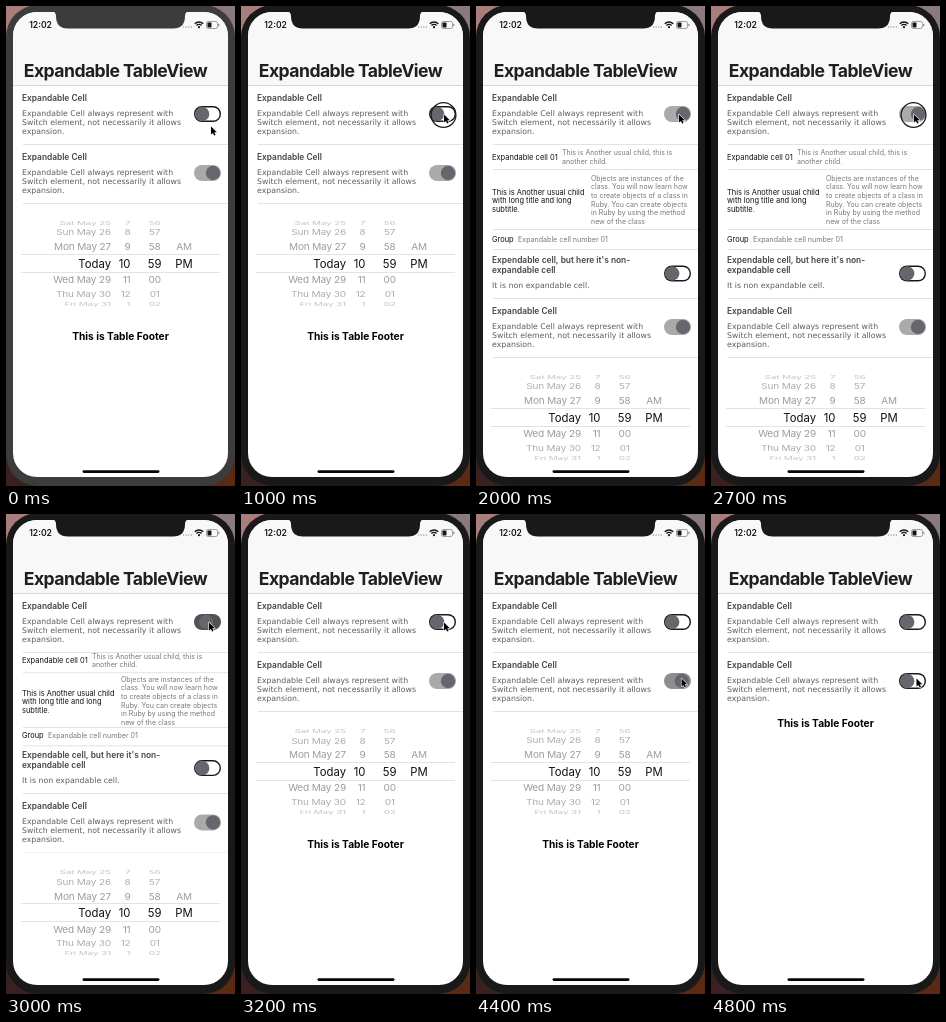
Animation of 229 by 480 pixels, one loop 5000 ms. Source, as an HTML page with a canvas:

```html
<!DOCTYPE html>
<html lang="en">
<head>
<meta charset="utf-8">
<title>Expandable TableView</title>
<style>
  html, body { margin: 0; width: 100%; height: 100%; overflow: hidden; background: #191919; }
  canvas { display: block; width: 229px; height: 480px; }
</style>
</head>
<body>
<canvas id="stage" width="229" height="480"></canvas>
<script>
const ctx = document.getElementById('stage').getContext('2d');
const LOOP = 5000, STEP = 100;
const CLICKS = { open: 900, close: 2700, hidePicker: 4200 };
const CHILD_HEIGHT = 154, PICKER_HEIGHT = 121;
const LEFT = 16;
const UI = 'Inter, sans-serif', BODY = '"DejaVu Sans", sans-serif';

const clamp = v => Math.max(0, Math.min(1, v));
const mix = (a, b, k) => a + (b - a) * k;
const smooth = v => { v = clamp(v); return v * v * (3 - 2 * v); };
const gray = v => `rgb(${v},${v},${v})`;

function text(str, x, y, size, color, { weight = 400, family = UI, align = 'left', track = 0 } = {}) {
  ctx.font = `${weight} ${size}px ${family}`;
  ctx.letterSpacing = track * size + 'px';
  ctx.textAlign = align;
  ctx.fillStyle = color;
  ctx.fillText(str, x, y);
}

function lines(list, x, y, leading, ...style) {
  list.forEach((str, i) => text(str, x, y + i * leading, ...style));
}

function roundRect(x, y, w, h, r, color) {
  ctx.fillStyle = color;
  ctx.beginPath();
  ctx.roundRect(x, y, w, h, r);
  ctx.fill();
}

function disc(x, y, r, color) {
  ctx.fillStyle = color;
  ctx.beginPath();
  ctx.arc(x, y, r, 0, Math.PI * 2);
  ctx.fill();
}

function separator(y, x = 17, right = 222, color = '#e3e3e3') {
  ctx.fillStyle = color;
  ctx.fillRect(x, Math.round(y), right - x, 1);
}

function clipped(y, h, alpha, draw) {
  if (h <= 0) return;
  ctx.save();
  ctx.beginPath();
  ctx.rect(7, y, 215, h);
  ctx.clip();
  ctx.globalAlpha = alpha;
  draw();
  ctx.restore();
}

// on runs from 0 (white, outlined) to 1 (gray, filled)
function toggle(y, on) {
  roundRect(188, y - 8, 27, 16, 8, gray(Math.round(mix(24, 170, on))));
  const inner = clamp((0.4 - on) / 0.4);
  if (inner > 0) {
    const w = 24.2 * inner, h = 13.2 * inner;
    roundRect(201.5 - w / 2, y - h / 2, w, h, h / 2, '#fff');
  }
  disc(mix(196.2, 207, smooth(on)), y, 7.2, '#66676e');
}

function expandableCell(top, on) {
  text('Expandable Cell', LEFT, top + 16, 8.35, '#444', { weight: 600 });
  lines(['Expandable Cell always represent with',
         'Switch element, not necessarily it allows',
         'expansion.'], LEFT, top + 30.6, 9.1, 7.8, '#5c5c5c', { family: BODY });
  toggle(top + 29, on);
}

function children(open) {
  const shift = CHILD_HEIGHT * (1 - open);
  const row = (lag, draw) => {
    ctx.save();
    ctx.translate(0, -shift * lag);
    draw();
    ctx.restore();
  };
  row(0.38, () => {
    text('Expandable cell 01', LEFT, 153.6, 7.5, '#111');
    lines(['This is Another usual child, this is', 'another child.'], 86, 149.4, 8.8, 7, '#777');
    separator(163);
  });
  row(0.56, () => {
    lines(['This is Another usual child', 'with long title and long', 'subtitle.'],
      LEFT, 188.6, 8.8, 7.45, '#111');
    lines(['Objects are instances of the', 'class. You will now learn how',
           'to create objects of a class in', 'Ruby. You can create objects',
           'in Ruby by using the method', 'new of the class'], 115, 174.6, 8.7, 7, '#777');
  });
  row(0.8, () => separator(223));
  row(0.93, () => {
    text('Group', LEFT, 236, 7.45, '#111');
    text('Expandable cell number 01', 42, 236, 7.1, '#777');
    separator(243);
  });
  row(1.07, () => {
    lines(["Expendable cell, but here it's non-", 'expandable cell'], LEFT, 257.4, 9.9, 8.4, '#444', { weight: 600 });
    text('It is non expandable cell.', LEFT, 282.4, 7.8, '#5c5c5c', { family: BODY });
    toggle(267.5, 0);
  });
}

const DAYS = ['Sat May 25', 'Sun May 26', 'Mon May 27', 'Today', 'Wed May 29', 'Thu May 30', 'Fri May 31'];

function picker(center) {
  const shades = ['#111', '#9c9c9c', '#acacac', '#c4c4c4'];
  DAYS.forEach((day, i) => {
    const d = i - 3, angle = d * 0.37, far = Math.abs(d);
    const size = far ? 10 : 11.3, color = shades[far];
    ctx.save();
    ctx.translate(0, center + 45.5 * Math.sin(angle));
    ctx.scale(1, far === 3 ? 0.5 : Math.cos(angle));
    const put = (str, x, align) => text(str, x, size * 0.36, size, color, { align, track: far ? -0.015 : 0 });
    put(day, 105, 'right');
    put(String((6 + i) % 12 + 1), 124.5, 'right');
    put(String((56 + i) % 60).padStart(2, '0'), 148.7, 'center');
    if (d === -1 || d === 0) put(d ? 'AM' : 'PM', 178, 'center');
    ctx.restore();
  });
  separator(center - 10, 15, 214);
  separator(center + 8, 15, 214);
}

function statusBar(bezel) {
  ctx.fillStyle = bezel;
  ctx.beginPath();
  ctx.moveTo(46, 5);
  ctx.quadraticCurveTo(50, 6, 50, 10);
  ctx.quadraticCurveTo(50, 22.5, 62, 22.5);
  ctx.lineTo(167, 22.5);
  ctx.quadraticCurveTo(179, 22.5, 179, 10);
  ctx.quadraticCurveTo(179, 6, 183, 5);
  ctx.fill();
  text('12:02', 23.2, 22, 8.6, '#161616', { weight: 600 });
  for (let i = 0; i < 4; i++) disc(177.5 + i * 2.6, 21, 0.7, '#999');
  ctx.strokeStyle = '#161616';
  ctx.lineWidth = 1.4;
  for (const r of [6, 3.6]) {
    ctx.beginPath();
    ctx.arc(193, 22, r, -Math.PI * 0.75, -Math.PI * 0.25);
    ctx.stroke();
  }
  disc(193, 21.2, 1.1, '#161616');
  ctx.strokeStyle = '#888';
  ctx.lineWidth = 0.8;
  ctx.beginPath();
  ctx.roundRect(200.5, 15.5, 11, 7, 1.8);
  ctx.stroke();
  roundRect(201.5, 16.5, 4, 5, 0.8, '#161616');
  roundRect(212.3, 17.8, 1, 2.4, 0.5, '#888');
}

function pointer(t) {
  const path = [[0, 300, -0.5, -2], [400, 700, -1.5, -10], [3500, 4100, 2.5, 56]];
  let x = 205, y = 120.5;
  for (const [from, to, dx, dy] of path) {
    const k = smooth((t - from) / (to - from));
    x += dx * k;
    y += dy * k;
  }
  if (Object.values(CLICKS).some(c => t >= c && t < c + 200)) {
    ctx.strokeStyle = '#1c1c1c';
    ctx.lineWidth = 1.3;
    ctx.beginPath();
    ctx.arc(x - 0.5, y + 0.5, 12.4, 0, Math.PI * 2);
    ctx.stroke();
  }
  ctx.save();
  ctx.translate(x, y);
  ctx.beginPath();
  [[0, 0], [0, 8], [1.9, 6.4], [3.2, 9], [4.5, 8.4], [3.3, 5.8], [5.8, 5.8]]
    .forEach(([px, py]) => ctx.lineTo(px, py));
  ctx.closePath();
  ctx.lineJoin = 'round';
  ctx.lineWidth = 1.2;
  ctx.strokeStyle = '#f4f4f4';
  ctx.stroke();
  ctx.fillStyle = '#000';
  ctx.fill();
  ctx.restore();
}

function phone(bezel) {
  ['#a87e7c', '#8a7a80', '#3b2020', '#5a2a14'].forEach((color, i) => {
    ctx.fillStyle = color;
    ctx.fillRect(i % 2 * 115, i < 2 ? 0 : 240, 115, 240);
  });
  roundRect(0, -1, 229, 481, 32, bezel);
}

function draw(t) {
  const flip = click => clamp((t - click - 150) / 250);
  const slide = click => smooth((t - click - 257) / 245);
  const open = slide(CLICKS.open) - slide(CLICKS.close);
  const pickerOpen = 1 - slide(CLICKS.hidePicker);
  const second = 138 + CHILD_HEIGHT * open;
  const third = second + 59;
  const footer = third + 16.4 + PICKER_HEIGHT * pickerOpen;
  const bezel = t < CLICKS.open ? '#3c3c3c' : '#191919';

  phone(bezel);

  ctx.save();
  ctx.beginPath();
  ctx.roundRect(7, 6, 215, 465, 24);
  ctx.clip();
  ctx.fillStyle = '#fff';
  ctx.fillRect(7, 6, 215, 465);
  ctx.fillStyle = '#f8f8f8';
  ctx.fillRect(7, 6, 215, 73);
  separator(79, 7, 222, '#d6d6d6');
  text('Expandable TableView', 17.8, 70.8, 17.6, '#1f1f1f', { weight: 700, track: -0.031 });

  expandableCell(79, flip(CLICKS.open) - flip(CLICKS.close));
  separator(138);
  clipped(139, second - 139, clamp(open * 1.2), () => children(open));
  if (open > 0) separator(second);
  expandableCell(second, 1 - flip(CLICKS.hidePicker));
  clipped(third, PICKER_HEIGHT * pickerOpen, clamp(pickerOpen * 1.2), () => {
    separator(third);
    picker(third + 60.5 - PICKER_HEIGHT * 0.4 * (1 - pickerOpen));
  });
  // the footer only shows once it clears the home indicator
  if (footer < 460) {
    text('This is Table Footer', 114.5, footer, 10.2, '#000', { weight: 700, align: 'center' });
  }
  roundRect(76.5, 464.2, 77, 2.8, 1.4, '#050505');
  ctx.restore();

  statusBar(bezel);
  pointer(t);
}

const start = performance.now();
function tick() {
  const t = (performance.now() - start) % LOOP;
  draw(Math.floor(t / STEP) * STEP);
  requestAnimationFrame(tick);
}
tick();
</script>
</body>
</html>
```
